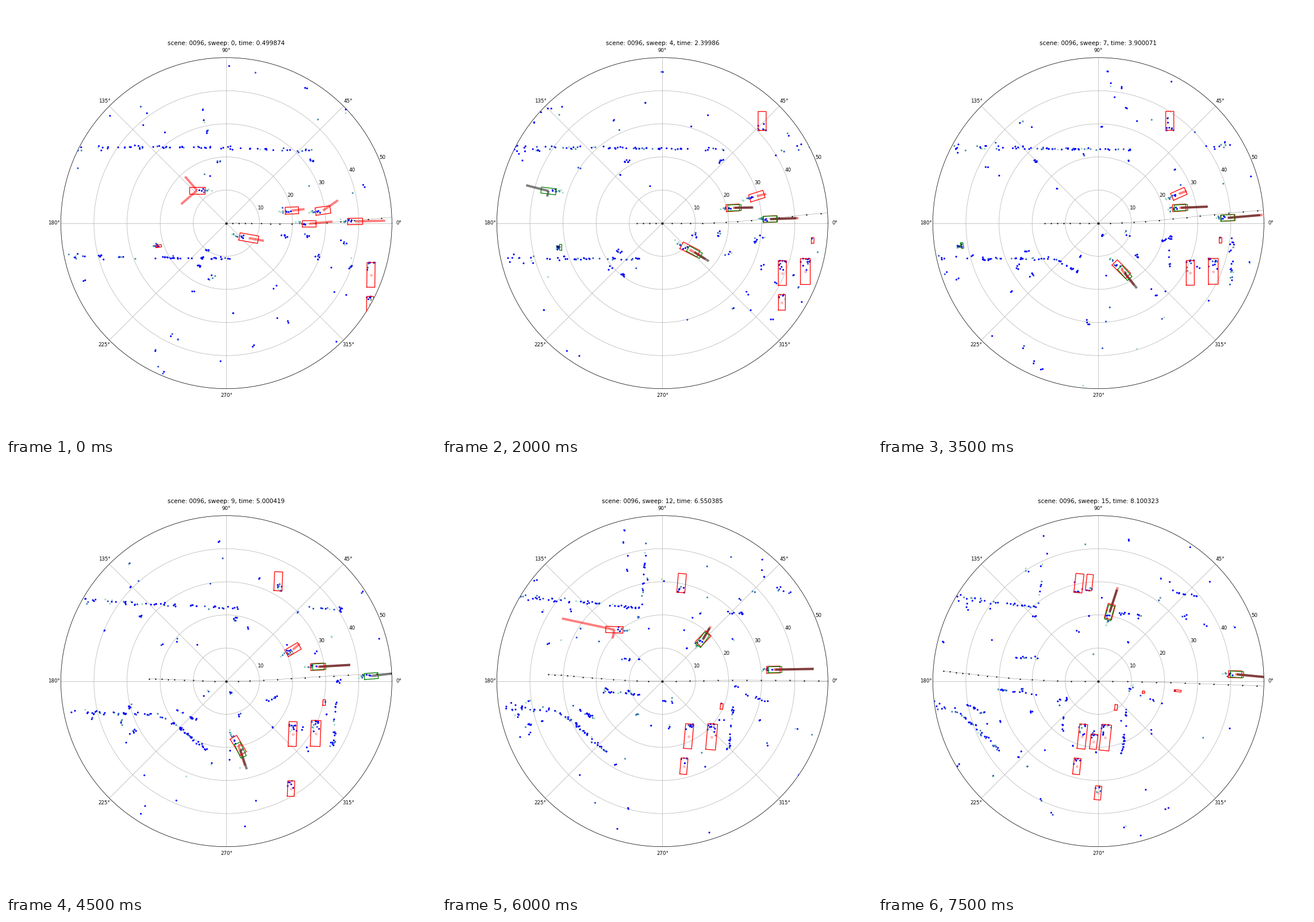
Animation of 748 by 748 pixels, one loop 8000 ms. Source, as a matplotlib script:

```python
import numpy as np
import matplotlib.pyplot as plt
from matplotlib.animation import FuncAnimation
from matplotlib.patches import Circle

SIZE, SWEEPS, R = 748, 16, 288
SHADES = ("#0000ff", "#2a55cc", "#4a8fa6", "#a5d9c3")

# ego motion at a few sweeps: distance (px), heading (degrees), clock (s)
KEYS = (0, 4, 7, 9, 11, 13, 15)
ks = np.arange(28)
DIST = np.interp(ks, KEYS + (27,), (0, 44, 93, 134, 175, 223, 270, 570))
HEAD = np.radians(np.interp(ks, KEYS + (18, 27), (0, -.8, -.9, 1.4, 3.3, 5, 5.5, 3.9, 3.1)))
TIMES = np.interp(ks[:SWEEPS], KEYS, (.499874, 2.39986, 3.900071, 5.000419,
                                      6.000186, 7.100584, 8.100323))
STEP = np.diff(DIST) * np.sin((HEAD[1:] + HEAD[:-1]) / 2)
PATH = np.column_stack([DIST, np.append(0, np.cumsum(STEP))])


def turn(p, a):
    c, s = np.cos(a), np.sin(a)
    return np.asarray(p, float) @ np.array([[c, s], [-s, c]])


def to_ego(k, p):
    return turn(np.asarray(p, float) - PATH[k], -HEAD[k])


def to_world(k, p):
    return turn(p, HEAD[k]) + PATH[k]


# walls in the world: x0, y0, x1, y1, points, furthest offset ahead
WALLS = [
    (-262, 131, -80, 133, 55, 200),
    (-80, 133, 155, 126, 85, 170),
    (-275, -58, 15, -62, 85, 5),
    (15, -62, 50, -80, 18, -35),
    (50, -80, 118, -134, 45, -35),
    (43, -51, 85, -70, 26, -28),
    (100, -22, 163, -25, 24, -35),
    (122, 35, 160, 38, 12, -35),
    (154, 130, 152, 270, 18, 10),
    (324, -28, 324, -106, 40, 250),
    (345, -10, 400, -24, 20, 220),
    (216, -60, 217, -86, 9, 230),
    (268, 131, 336, 129, 18, 240),
    (362, 177, 436, 172, 24, 215),
    (362, 180, 358, 230, 8, 190),
]
# compact reflectors
SPOTS = [(-48, -76), (-25, -90), (-33, -48), (148, 108), (-16, 107), (101, -22), (141, -21),
         (218, -28), (206, -33), (327, 2), (321, -108), (160, -58), (331, 129), (410, 135)]
# parked boxes: x, y, width, height, first and last sweep
PARKED = [
    (251.5, -90, 14, 43, 0, 15), (291.5, -88, 17, 45, 1, 15), (250, -141, 12, 27, 0, 4),
    (247, -142.5, 12, 28, 10, 15), (251, -185, 12, 27, 9, 11), (270, -139, 12, 29, 11, 11),
    (251, -238, 12, 28, 11, 11), (212, -277, 11, 26, 13, 13), (288, -185, 11, 24, 15, 15),
    (272, -97, 12, 26, 14, 15), (220, 175, 14, 33, 3, 15), (238, 178, 11, 28, 13, 15),
    (221, 270, 13, 30, 11, 11), (313, 226, 12, 28, 11, 11), (305, -34, 4.5, 10, 2, 15),
    (350, -3, 4, 4, 13, 15), (409, 5, 12, 3, 15, 15),
]


def curve(keys, vals):
    """The polynomial through a few keys."""
    vals = np.broadcast_to(vals, len(keys))
    return np.poly1d(np.polyfit(keys, vals, len(keys) - 1))


def track(keys, x, y, ang, size, red, green=(), lead=0, skew=0):
    """A moving box through stage positions; skew splits its speed arrow in two."""
    return dict(x=curve(keys, x), y=curve(keys, y), ang=curve(keys, ang),
                skew=curve(keys, skew), size=size, red=red, green=green, lead=lead)


TRACKS = [
    track((0, 8, 15), (497, 532, 621), (356, 352, 366), (2, 3, -1), (23, 12),
          range(16), range(1, 16), 3),
    track((0, 4, 9), (527, 571, 636), (379, 371, 369), (0, 2, 2), (24, 11),
          range(9), range(1, 10), -1),
    track((0, 2), (607, 640), (375, 372), 1, (26, 11), (0, 1)),
    track((0, 7, 11, 15), (551, 523, 470, 403), (356, 327, 313, 257), (8, 24, 40, 75),
          (26, 13), range(16), (11, 12, 15), -2),
    track((0, 4, 7, 11), (422, 431, 423, 369), (404, 424, 458, 529), (-10, -27, -45, -74),
          (33, 13), range(12), range(1, 12), 9, (0, 0, -5, -15)),
    track((0, 4), (332, 185), (321, 322), 180, (27, 12), range(3), range(1, 6), 0, (-49, -14)),
    track((11, 13), (372, 227), (292, 285), (180, 176), (30, 11), range(11, 15), skew=(7, -26)),
    track((0, 4, 7), (265, 206, 146), (418, 420, 417), 8, (10, 4), (0,), range(1, 8)),
]

# fixed points of the world, each seen in some sweeps
seed = np.random.default_rng(7)
ANCHORS = [(np.array([x0, y0]) + seed.random((n, 1)) * (x1 - x0, y1 - y0), ahead)
           for x0, y0, x1, y1, n, ahead in WALLS]
FIELD = np.column_stack([seed.uniform(-260, 560, 260),
                         seed.choice((-1, 1), 260) * seed.uniform(50, 285, 260)])

fig = plt.figure(figsize=(12, 12), dpi=SIZE / 12, facecolor="white")
ax = fig.add_subplot(projection="polar")
ax.set_ylim(0, 50)
ax.set_yticks(range(10, 51, 10))
top = fig.add_axes([.125, .11, .775, .77])
top.set(xlim=(-R, R), ylim=(-R, R), aspect="equal")
top.axis("off")
disc = Circle((0, 0), R, transform=top.transData)
live = []


def keep(artist):
    artist.set_clip_path(disc)
    live.append(artist)


def line(p, **style):
    p = np.asarray(p)
    keep(top.plot(p[:, 0], p[:, 1], **style)[0])


def box(c, size, ang, color):
    corners = np.array([(-1, -1), (1, -1), (1, 1), (-1, 1), (-1, -1)]) * size / 2
    line(turn(corners, ang) + c, color=color, lw=1.5, solid_joinstyle="miter", zorder=4)


def arrows(c, v, skew, color):
    """Speed split along a skewed axis and across it."""
    axis = turn(v, skew) / (np.hypot(*v) + 1e-9)
    along = axis * (v @ axis)
    for part in (along, v - along):
        if np.hypot(*part) > 2:
            line([c, c + part], color=color, lw=4.6, alpha=.5, solid_capstyle="butt", zorder=3)


def spot(t, k):
    return np.array([t["x"](k) - 383, 378 - t["y"](k)])


def speed(t, k):
    """Speed over ground, drawn at the scale of the arrows."""
    a, b = max(k - 1, 0), k + 1
    step = (to_world(b, spot(t, b)) - to_world(a, spot(t, a))) / (b - a)
    return 1.9 * turn(step, -HEAD[k])


def draw_track(t, k, rng, cloud):
    if k not in t["red"] and k not in t["green"]:
        return
    c, v = spot(t, k), speed(t, k)
    ang, skew = np.radians(t["ang"](k)), np.radians(t["skew"](k))
    ahead = turn((1, 0), ang)
    w, h = t["size"]
    if k in t["red"]:
        box(c, (w, h), ang, "red")
        arrows(c, v, skew, "red")
    if k in t["green"]:
        mid = turn(ahead, skew) + v / (np.hypot(*v) + 1e-9)
        g = c + t["lead"] * mid / (np.hypot(*mid) + 1e-9)
        box(g, (min(w, 26), min(h, 10.5)), np.arctan2(mid[1], mid[0]), "green")
        arrows(g, v * .95, skew, "black")
    for u in np.linspace(0, 1, 9):
        p = c - ahead * w * (.2 + .7 * u) + rng.normal(0, 1.8, 2)
        cloud.append((*p, int(u * 3.9)))


def draw_parked(k, rng, cloud):
    tilt = -HEAD[k] - .014
    for x, y, w, h, first, last in PARKED:
        if not first <= k <= last:
            continue
        c = to_ego(k, (x, y))
        box(c, (w, h), tilt, "red")
        if h > 20 and y < 0:
            line([c], color="red", alpha=.6, marker="h", ms=4, mfc="none", mew=.9)
        near = -np.sign(y)
        for _ in range(int(w * h / 62) + 1):
            q = (rng.uniform(-w, w) / 2, near * h * (.5 - .45 * rng.random() ** 2.5))
            cloud.append((*(turn(q, tilt) + c), rng.choice(4, p=(.7, .15, .1, .05))))


def draw_scene(k, rng, cloud):
    def echo(p, blur, n=1):
        for _ in range(n):
            shade = rng.choice(4, p=(.66, .14, .12, .08))
            cloud.append((*(p + rng.normal(0, blur, 2)), shade))

    for pts, ahead in ANCHORS:
        for p in to_ego(k, pts):
            if p[0] < ahead and rng.random() < (.65 if p[0] < 0 else .42):
                echo(p, 1.1 + 4 * (np.hypot(*p) / R) ** 6)
    for p in to_ego(k, SPOTS):
        if p[0] < 215:
            echo(p, 2.4, rng.integers(3, 7))
    for p in to_ego(k, FIELD):
        if rng.random() < .3:
            echo(p, 1.8, rng.integers(1, 3))


def draw(k):
    while live:
        live.pop().remove()
    rng = np.random.default_rng(100 + k)
    ax.set_title(f"scene: 0096, sweep: {k}, time: {round(float(TIMES[k]), 6)}")
    line(to_ego(k, PATH), color="0.35", lw=.4, marker="o", ms=2.6, mfc="k", mec="none", zorder=2)
    line([(0, 0)], marker="o", ms=3.6, color="#000030", zorder=2)
    cloud = []
    draw_scene(k, rng, cloud)
    draw_parked(k, rng, cloud)
    for t in TRACKS:
        draw_track(t, k, rng, cloud)
    cloud.sort(key=lambda d: -d[2])
    x, y, c = zip(*cloud)
    keep(top.scatter(x, y, s=13, c=[SHADES[i] for i in c], linewidths=0, zorder=2.5))
    return live


anim = FuncAnimation(fig, draw, frames=SWEEPS, interval=500, repeat=True, repeat_delay=0)
plt.show()
```
